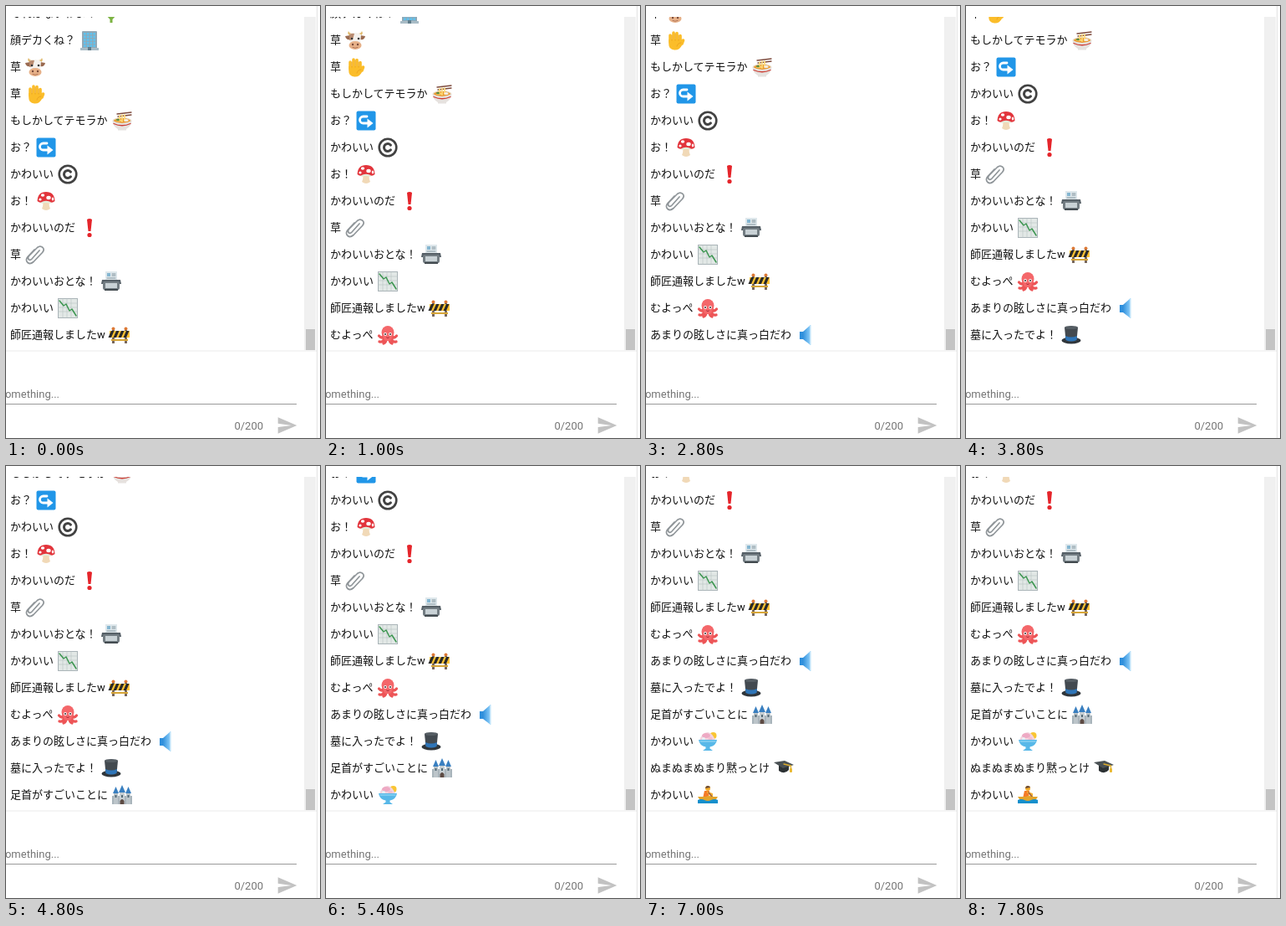
Write an HTML page that moves like this. It is 376x516 px and loops after 8000 ms.

```html
<!DOCTYPE html>
<html lang="ja">
<head>
<meta charset="utf-8">
<style>
  html, body { margin: 0; width: 100%; height: 100%; overflow: hidden; background: #fff; }
  svg { display: block; }
  text { font: 13px Roboto, "Noto Sans CJK JP", "Noto Sans CJK", sans-serif; fill: #111; }
  .hint { fill: #757575; }
</style>
</head>
<body>
<svg width="376" height="516" viewBox="0 0 376 516">
  <clipPath id="view"><rect y="13" width="357" height="398"/></clipPath>
  <linearGradient id="sound"><stop offset=".3" stop-color="#2f8fdc"/><stop offset="1" stop-color="#8fd0fa"/></linearGradient>
  <g clip-path="url(#view)"><g id="rows"></g></g>
  <rect x="357" y="13" width="14" height="398" fill="#f0f0f0"/>
  <rect x="359" y="386" width="11" height="26" fill="#c4c4c4"/>
  <rect y="411" width="372" height="2" fill="#f5f5f5"/>
  <rect x="372" width="1" height="516" fill="#e2e2e2"/>
  <text class="hint" x="64" y="468" text-anchor="end">Say something...</text>
  <rect y="475" width="348" height="1" fill="#999"/>
  <text class="hint" x="308" y="506" text-anchor="end">0/200</text>
  <path d="M2 21 23 12 2 3V10L17 12 2 14z" fill="#c2c2c2" transform="translate(323.5 488) scale(1.08)"/>
</svg>
<script>
const fill = (color, d) => `<path fill="${color}" d="${d}"/>`;
const line = (color, width, d) =>
  `<path fill="none" stroke="${color}" stroke-width="${width}" stroke-linecap="round" stroke-linejoin="round" d="${d}"/>`;
const oval = (color, cx, cy, rx, ry = rx) =>
  `<ellipse fill="${color}" cx="${cx}" cy="${cy}" rx="${rx}" ry="${ry}"/>`;
const box = (color, x, y, w, h, r = 0) =>
  `<rect fill="${color}" x="${x}" y="${y}" width="${w}" height="${h}" rx="${r}"/>`;
const range = (n, make) => Array.from({ length: n }, (_, i) => make(i)).join('');

// Each icon is drawn in a 24 by 24 square.
const icons = {
  sprout: oval('#63a83c', 12, 9, 9, 7) + fill('#7cb342', 'M5 13H19L13.5 19V23H10.5V19z'),
  office: box('#90a9b7', 3, 1, 18, 21, 1) + box('#a9bcc6', 1, 21, 22, 3) +
    range(20, i => box('#5cc3f2', 5 + i % 4 * 3.8, 3 + (i >> 2) * 3.6, 2.6, 2.5)) +
    box('#607d8b', 10, 20, 4, 4),
  cow: fill('#e0b96a', 'M5 6Q2 4 4 1Q5 4 9 4zM19 6Q22 4 20 1Q19 4 15 4z') +
    fill('#9a6a50', 'M6 6 0 7Q1 12 6 11zM18 6 24 7Q23 12 18 11z') +
    fill('#f4f1ed', 'M5 5Q12 1 19 5L18 17H6z') + fill('#b98b70', 'M5 5Q9 3 11 4L9 11 5 12z') +
    oval('#333', 8, 10, 1.3) + oval('#333', 16, 10, 1.3) + oval('#e7b189', 12, 18, 7.5, 5) +
    oval('#7a4b3a', 9, 17, 1.2) + oval('#7a4b3a', 15, 17, 1.2) + line('#a5684c', .8, 'M9 20.5Q12 22 15 20.5'),
  hand: line('#fbbd2a', 3.6, 'M6 14V6M10 12V3M14 12V3.5M18 13V6.5M20 16 21.5 12') +
    fill('#fbbd2a', 'M4.2 11H19.8L20 18Q17 24 11 23.5Q4 23 4.2 16z') +
    line('#e59a1c', .7, 'M8 6V12M12 4V12M16 6V12M14 19Q15 15 19 15'),
  ramen: line('#7d4a3c', 1.3, 'M6 4 23 2M7 7 23 5') + oval('#e8dccb', 12, 12, 11.5, 4) +
    oval('#e99a32', 12, 12, 10, 3) + line('#ffdc79', 1.7, 'M9 6V12M12 5V13M15 5V12M6 12H11') +
    oval('#f2eee6', 17, 11.5, 2.7, 1.5) + oval('#5c8d42', 7, 11, 2, 1.2) +
    fill('#e6e2df', 'M.5 12Q12 18 23.5 12Q23 19 17 22V23.5H7V22Q1 19 .5 12z') +
    line('#cc3f37', 1.3, 'M2 15.5Q12 20 22 15.5'),
  turn: box('#2196e8', .5, .5, 23, 23, 2) + line('#fff', 2.8, 'M13 7H8.5A4 4 0 0 0 8.5 15H14') +
    fill('#fff', 'M13.5 9.5 20.5 15 13.5 20.5z'),
  copyright: '<circle cx="12" cy="12" r="10.3" fill="#fff" stroke="#424242" stroke-width="2.6"/>' +
    line('#424242', 3, 'M15.5 9.2A4.5 4.5 0 1 0 15.5 14.8'),
  mushroom: fill('#f1d9b7', 'M8 11H16Q15 17 17 21Q12 25 7 21Q9 17 8 11z') +
    fill('#e3eddc', 'M5 13Q12 9 19 13L17 15Q12 13 7 15z') +
    fill('#e2353c', 'M1.5 12Q2 1 12 1Q22 1 22.5 12Q19 15 16 12.5Q12 11 8 12.5Q5 15 1.5 12z') +
    oval('#fff', 8, 5, 2.2, 1.7) + oval('#fff', 15, 8, 2.7, 2.2) + oval('#fff', 5, 10, 1.6) + oval('#fff', 20, 9.5, 1.2, 2),
  alert: fill('#e5252b', 'M9 2Q12 0 15 2L13.5 16H10.5z') + oval('#e5252b', 12, 20.5, 2.6),
  clip: line('#8f9599', 1.7, 'M17 7 8 17Q5.5 19.5 4 17.5Q2.5 15.5 5 13L14.5 3.5Q18 .8 21 3.5Q23.5 6 20.5 9.5L10 20.5Q6 24 3 21.5Q-.3 18.5 3 14.5L11 6'),
  fax: box('#dfe8ec', 5, 0, 14, 10) + box('#84b6d1', 7, 2, 4, 4) +
    line('#81939c', 1, 'M13 3H17M13 5H17M7 8H17') + fill('#566067', 'M1 10H23L24 15H0z') +
    box('#737d83', 2, 12, 20, 10, 2) + box('#c9d2d6', 5, 14, 14, 6) + box('#434b50', 4, 21, 16, 2),
  chart: box('#aab4b8', 0, 0, 24, 24) + box('#e2e8e6', 1, 1, 22, 22) +
    line('#bdc8c6', .7, 'M1 6H23M1 11H23M1 16H23M6 1V23M11 1V23M16 1V23') +
    line('#3c9650', 1.5, 'M2 3 7 9 10 7 14 15 17 13 22 21'),
  barrier: oval('#dd7a37', 4.5, 4.5, 2) + oval('#dd7a37', 19.5, 4.5, 2) +
    box('#77675c', 3, 6, 3, 16) + box('#77675c', 18, 6, 3, 16) + box('#fbc132', 0, 7, 24, 8) +
    range(4, i => fill('#292929', `M${i * 6 + 2} 7h3.5l-3.5 8h-3.5z`)) +
    box('#d7a638', 2, 17, 20, 2),
  octopus: line('#ed5557', 3.3, 'M7 13Q5 17 1.5 13M17 13Q19 17 22.5 13M8 15Q7 21 2 20M16 15Q17 21 22 20M10 16Q10 21 7 22M14 16Q14 21 17 22') +
    oval('#f4676a', 12, 9, 7.5, 8) + box('#f4676a', 7, 9, 10, 10, 4) +
    oval('#fff', 9, 11, 1.9) + oval('#fff', 15, 11, 1.9) + oval('#333', 9, 11, 1) + oval('#333', 15, 11, 1) +
    line('#a92f39', 1, 'M10.5 15Q12 16.5 13.5 15'),
  speaker: fill('url(#sound)', 'M5 8H9L18 0V24L9 17H5z') + box('#bce2fa', 17, 0, 1.5, 24),
  hat: oval('#30363b', 12, 18.5, 11.5, 4) + fill('#434a50', 'M4 3Q12 0 20 3L18.5 18Q12 21 5.5 18z') +
    fill('#2e75b8', 'M5 13Q12 16 19 13L18.5 18Q12 21 5.5 18z') + oval('#565e64', 12, 3, 8, 2),
  castle: box('#a9b4bb', 0, 13, 24, 10) + box('#bcc5ca', 2, 9, 5, 14) + box('#bcc5ca', 17, 9, 5, 14) +
    box('#c7cfd3', 9, 8, 6, 15) + fill('#397fc0', 'M1 10 4.5 2 8 10zM16 10 19.5 2 23 10zM8 9 12 0 16 9z') +
    range(3, i => box('#536975', 3.5 + i * 7.5, 12, 2, 3)) + fill('#5d4b44', 'M9.5 23V19Q12 15 14.5 19V23z'),
  ice: oval('#f9c533', 18.5, 5, 4) + fill('#f3d3df', 'M2 11Q5 1 12 1Q18 2 21 11z') +
    oval('#eeaac4', 10, 5, 5, 3) + oval('#e7f1f5', 7, 9, 2) + oval('#f2bfd0', 15, 9, 2.5) +
    fill('#58b8e8', 'M1 10H23Q22 17 14.5 18.5V20.5L18 23H6L9.5 20.5V18.5Q2 17 1 10z') +
    line('#a2def7', 1, 'M3 12H21'),
  cap: fill('#2c3134', 'M6 9V15Q13 20 18 14V9z') + fill('#4a5154', 'M0 5 13 3 24 8 11 12z') +
    line('#dfae2d', 1.3, 'M12 7 20.5 9V13') + box('#eab932', 19, 12, 3, 5, 1),
  rower: oval('#f5ae2d', 12, 4, 3) + fill('#694b3b', 'M9 4Q10 -.5 14 1.5L15 3z') +
    fill('#f47b27', 'M8 7H14L13 16H6z') + line('#f5ae2d', 2.3, 'M12 9 17 11M10 15 17 13') +
    line('#9a6042', 1.3, 'M13 9 21 19') + fill('#e3a52c', 'M0 14H24L20 20H4z') +
    fill('#168fcc', 'M0 18Q4 16 8 18T16 18T24 18V22H0z')
};

const messages = [
  ['それはないわよ！', 'sprout'], ['顔デカくね？', 'office'], ['草', 'cow'], ['草', 'hand'],
  ['もしかしてテモラか', 'ramen'], ['お？', 'turn'], ['かわいい', 'copyright'], ['お！', 'mushroom'],
  ['かわいいのだ', 'alert'], ['草', 'clip'], ['かわいいおとな！', 'fax'], ['かわいい', 'chart'],
  ['師匠通報しましたw', 'barrier'], ['むよっぺ', 'octopus'], ['あまりの眩しさに真っ白だわ', 'speaker'],
  ['墓に入ったでよ！', 'hat'], ['足首がすごいことに', 'castle'], ['かわいい', 'ice'],
  ['ぬまぬまぬまり黙っとけ', 'cap'], ['かわいい', 'rower']
];
const rowHeight = 32;
const textWidth = text => [...text].reduce((sum, c) => sum + (c < '~' ? 9.8 : 13), 0);

const rows = document.getElementById('rows');
rows.innerHTML = messages.map(([text, icon], i) => {
  const y = 8 + i * rowHeight;
  return `<text x="5" y="${y + 5}">${text}</text>
    <g transform="translate(${Math.round(10 + textWidth(text))} ${y - 11})">${icons[icon]}</g>`;
}).join('');

// Times at which a new message pushes the list up one row.
const duration = 8000;
const arrivals = [0, 800, 2200, 3400, 4400, 5200, 5800, 7000];
const steps = arrivals.map((time, i) => ({
  offset: time / duration,
  transform: `translateY(${-i * rowHeight}px)`,
  easing: 'step-end'
}));
steps.push({ ...steps[steps.length - 1], offset: 1 });
rows.animate(steps, { duration, iterations: Infinity });
</script>
</body>
</html>
```
